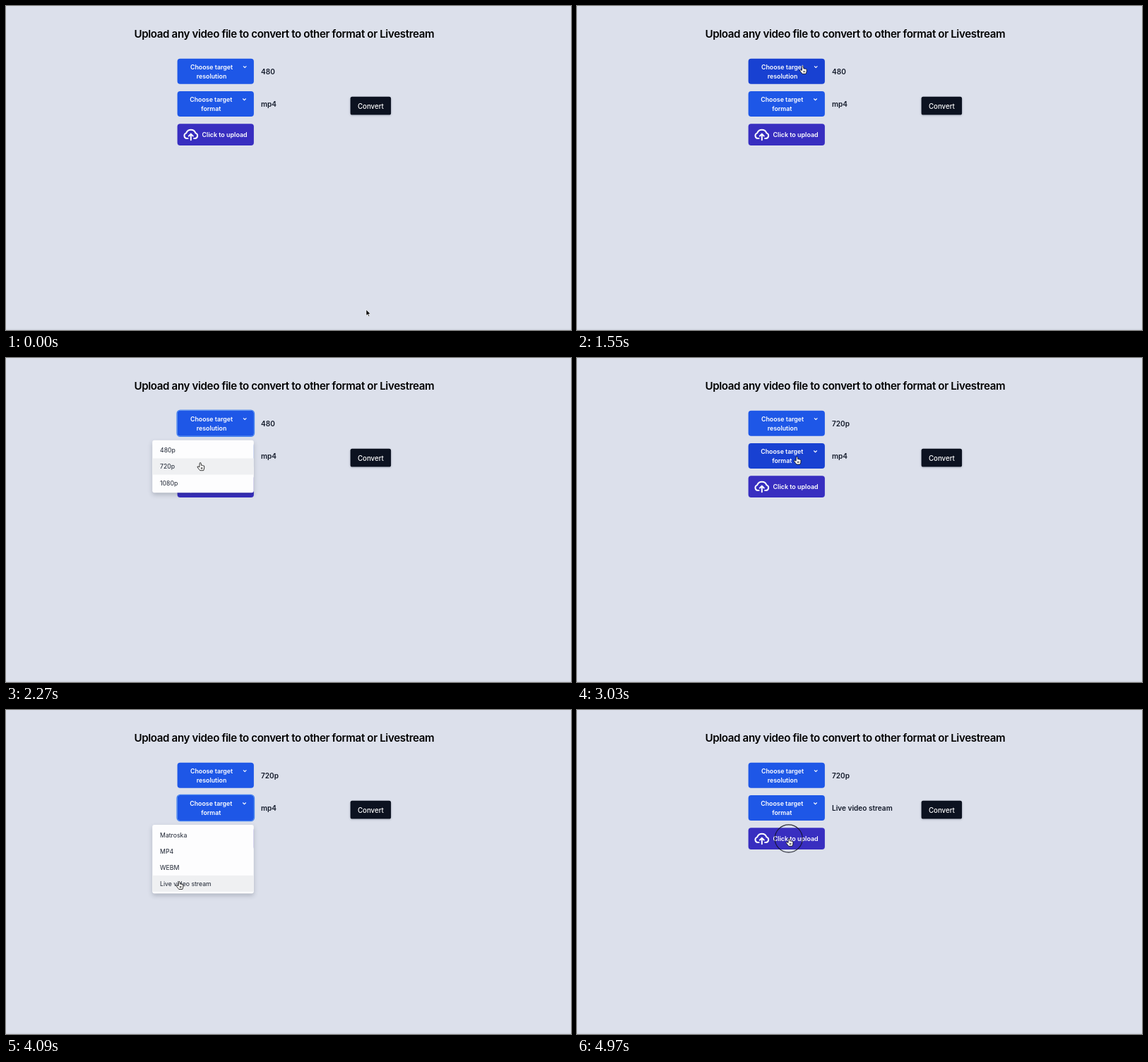
Write an HTML page that moves like this. It is 800 px wide and 460 px high and loops after 5000 ms.

```html
<!DOCTYPE html>
<html lang="en">
<head>
<meta charset="utf-8">
<title>Video converter</title>
<style>
  html, body { margin: 0; height: 100%; overflow: hidden; background: #dce0eb; }
  svg { display: block; width: 800px; height: 460px; font-family: Inter, "Open Sans", sans-serif; }
  .title { font-size: 15.13px; font-weight: 600; letter-spacing: -.025em; }
  .mid { text-anchor: middle; }
  .small { font-size: 8.8px; font-weight: 600; fill: #fff; }
  .label { font-size: 10.07px; font-weight: 600; fill: #121929; }
  .item { font-size: 8.73px; fill: #1c2331; }
  .line { fill: none; stroke: #fff; }
  .menu { filter: drop-shadow(0 3px 3px #0f172a38); }
</style>
</head>
<body>
<svg id="stage" viewBox="0 0 800 460"></svg>
<script>
const LOOP = 5000, ROW = 23.1;

// Pointer path: time, x, y
const path = [
  [0, 510, 431], [60, 510, 431], [620, 312.8, 92.5], [730, 312.8, 92.5],
  [1500, 319.6, 85.3], [1800, 319.6, 85.3], [2180, 275.2, 148.7], [2500, 275.2, 148.7],
  [2900, 311.4, 140], [3220, 311.4, 140], [3800, 252, 221], [4000, 245.3, 243.5],
  [4290, 245.3, 243.5], [4860, 300.3, 182.3], [5000, 300.3, 182.3]
];
const presses = [[1720, 1800], [2400, 2480], [3120, 3200], [4200, 4280], [4935, 5000]];

const pickers = [
  { y: 75, cx: 291, word: 'resolution', items: ['480p', '720p', '1080p'],
    open: 1800, close: 2480, before: '480', after: '720p' },
  { y: 121.2, cx: 290.3, word: 'format', items: ['Matroska', 'MP4', 'WEBM', 'Live video stream'],
    open: 3200, close: 4280, before: 'mp4', after: 'Live video stream' }
];

const rect = (x, y, w, h, r, fill, extra = '') =>
  `<rect x="${x}" y="${y}" width="${w}" height="${h}" rx="${r}" fill="${fill}" ${extra}/>`;
const text = (x, y, cls, str, extra = '') =>
  `<text x="${x}" y="${y}" class="${cls}" ${extra}>${str}</text>`;

const button = ({ y, cx, word }, i) =>
  rect(242.6, y - .2, 108.3, 36, 4, '#1e57e7', `id="btn${i}"`) +
  text(cx, y + 15, 'small mid', 'Choose target') +
  text(cx, y + 27.8, 'small mid', word) +
  `<path class="line" stroke-width="1.1" d="M${cx + 45} ${y + 10.3}l2.2 2.2 2.2-2.2"/>` +
  text(361, y + 21.9, 'label', '', `id="label${i}"`);

const menu = ({ y, items }, i) =>
  `<g id="menu${i}">` +
  rect(242, y - .8, 109.5, 37.2, 4.6, 'none', 'stroke="#4583f0" stroke-width="1.3"') +
  '<g class="menu">' + rect(207.2, y + 41.8, 143.6, items.length * ROW + 5.2, 3, '#fdfdfe') + '</g>' +
  rect(207.2, 0, 143.6, ROW, 0, '#eff0f2', `id="hover${i}"`) +
  items.map((s, n) => text(218, y + 59.3 + n * ROW, 'item', s)).join('') + '</g>';

stage.innerHTML =
  rect(0, 458.6, 800, 1.4, 0, '#d0d4df') +
  text(393.8, 45, 'title mid', 'Upload any video file to convert to other format or Livestream') +
  pickers.map(button).join('') +
  rect(242.6, 167.3, 108.3, 30.6, 4, '#382ec0') +
  `<g class="line" stroke-width="2" stroke-linecap="round" stroke-linejoin="round">
    <path d="M257.5 188H256a3.9 3.9 0 0 1-.8-7.6a7 7 0 0 1 13.2 0a3.9 3.9 0 0 1-.8 7.6h-1.5"/>
    <path d="M261.8 190.2V181.8M258.8 184.6l3-3 3 3"/></g>` +
  text(309.6, 186.2, 'small mid', 'Click to upload', 'style="font-size:8.95px"') +
  '<g class="menu" style="filter:drop-shadow(0 1.5px 1.5px #0f172a38)">' +
  rect(487.6, 128.8, 57.5, 25.8, 2.6, '#0c1220') + '</g>' +
  text(516.4, 145.6, 'small mid', 'Convert', 'style="font-size:9.7px;font-weight:500"') +
  pickers.map(menu).join('') +
  `<circle id="ring" r="19.6" fill="none" stroke="#10121c" stroke-width="1.1" stroke-opacity=".85"/>
  <g id="pointer">
    <path id="arrow" fill="#000" stroke="#fff" stroke-width=".7" d="M0 0V8.6L2 6.8 3.3 9.8 4.6 9.2 3.4 6.3H6Z"/>
    <path id="hand" fill="#fff" stroke="#000" stroke-width=".8" stroke-linejoin="round"
      d="M-1 .9a.95.95 0 0 1 1.9 0l.5 3q.9-.8 1.5.1 1-.6 1.4.3 1.2-.3 1.3 1l-.2 3-.9 2.7h-5l-1.3-1.6-2.4-3.1q-.3-1.3 1.2-1l1.7 1zM1.2 6.6v2.4M2.7 6.6v2.4"/>
  </g>`;

const el = id => document.getElementById(id);
const show = (node, on) => node.setAttribute('visibility', on ? 'visible' : 'hidden');
const inside = (x, y, left, top, w, h) => x >= left && x < left + w && y >= top && y < top + h;

function pointerAt(t) {
  const n = path.findIndex(p => p[0] > t);
  const [t0, x0, y0] = path[n - 1], [t1, x1, y1] = path[n];
  const u = (t - t0) / (t1 - t0), k = u * u * (3 - 2 * u);
  return [x0 + (x1 - x0) * k, y0 + (y1 - y0) * k];
}

function draw(t) {
  const [x, y] = pointerAt(t);
  const isOpen = p => t >= p.open && t < p.close;
  let overMenu = false;
  let clickable = inside(x, y, 243, 167.5, 108, 30.5) || inside(x, y, 488, 129, 57, 26);

  pickers.forEach((p, i) => {
    const top = p.y + 44.4, row = Math.floor((y - top) / ROW);
    const onRow = isOpen(p) && inside(x, y, 207, top, 144, p.items.length * ROW);
    overMenu ||= onRow;
    show(el('menu' + i), isOpen(p));
    show(el('hover' + i), onRow);
    el('hover' + i).setAttribute('y', top + row * ROW);
    el('label' + i).textContent = t < p.close ? p.before : p.after;
  });
  pickers.forEach((p, i) => {
    const over = !overMenu && inside(x, y, 243, p.y, 108, 36);
    clickable ||= over;
    el('btn' + i).setAttribute('fill', over ? '#1841d2' : '#1e57e7');
  });

  const hand = overMenu || clickable;
  show(el('hand'), hand);
  show(el('arrow'), !hand);
  show(el('ring'), presses.some(([a, b]) => t >= a && t < b));
  el('pointer').setAttribute('transform', `translate(${x} ${y})`);
  el('ring').setAttribute('transform', `translate(${x - .6} ${y + .2})`);
}

const start = performance.now();
(function tick() {
  draw((performance.now() - start) % LOOP);
  requestAnimationFrame(tick);
})();
</script>
</body>
</html>
```
